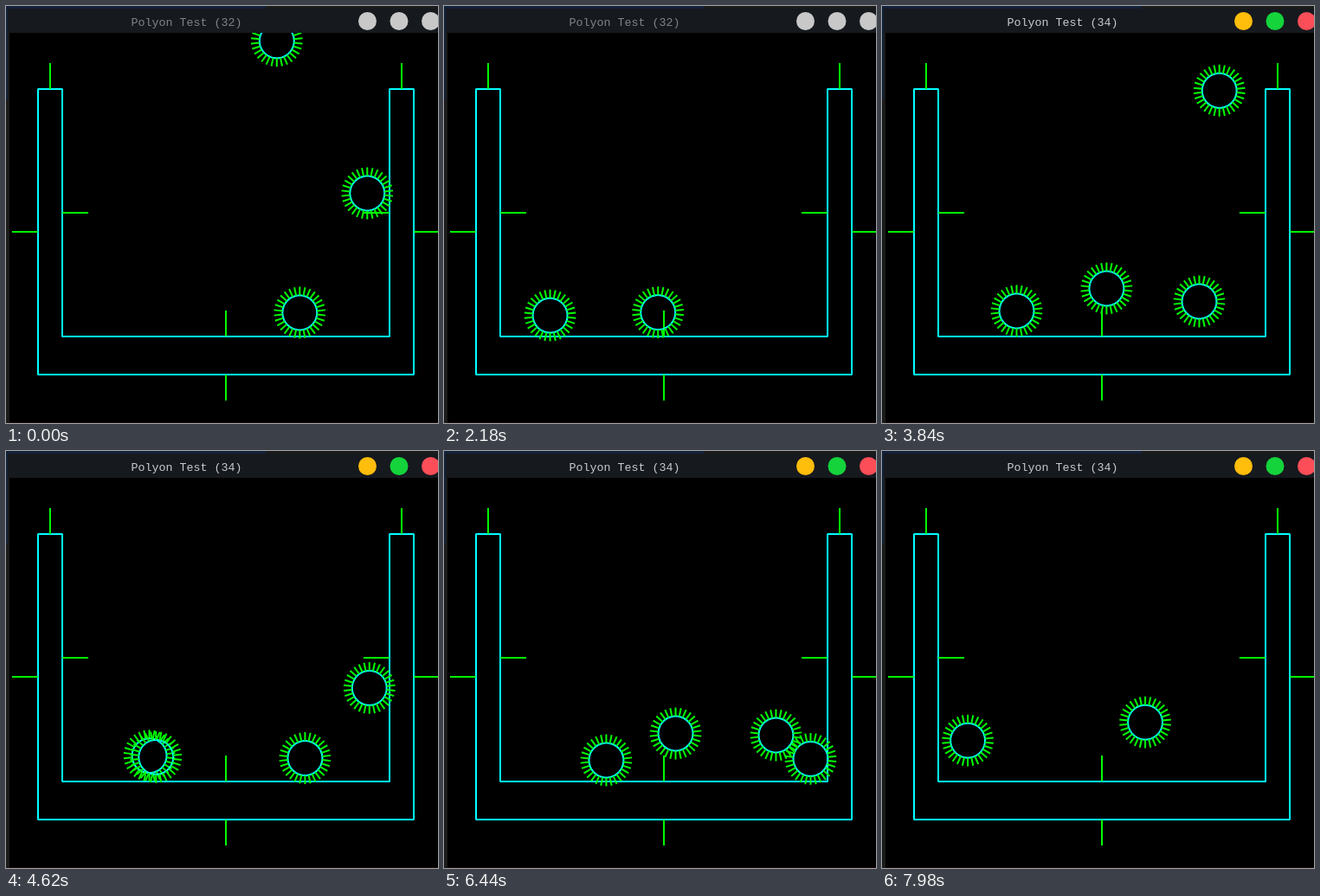
Animation, 499 px wide and 482 px high, one loop 8 s. Source, as an HTML page with a canvas:

```html
<!DOCTYPE html>
<html>
<head>
<meta charset="utf-8">
<style>
  html, body { margin: 0; width: 100%; height: 100%; overflow: hidden; background: #000; }
  canvas { display: block; }
</style>
</head>
<body>
<canvas id="stage" width="499" height="482"></canvas>
<script>
const ctx = document.getElementById('stage').getContext('2d');
const LOOP = 8, GRAVITY = 500, HOP = .4;
const LEFT = 85, RIGHT = 423, FLOOR = 362;
const RADIUS = 20, SIDES = 30, SPIKE = 10;
const CYAN = '#0ff', GREEN = '#0f0';
const SECOND_DROP = 2.19, THIRD_DROP = 3.81;

// Key poses [seconds, x, y]. An x beyond a wall is mirrored back by fold().
const escaping = [[0, 312, 40], [.8, 545, 70]];
const bouncing = [
  [[0, 417, 216], [1.36, 121, 322], [2.96, 366, 352], [3.84, 480, 341],
   [5.47, 524, 351], [6.44, 579, 326], [LOOP, 542, 313]],
  [[0, 339, 354], [1.36, 70, 350], [2.96, 27, 328], [3.84, 15, 352],
   [5.47, -6, 353], [6.44, -17, 357], [LOOP, 100, 334]],
  [[SECOND_DROP, 357, 164], [2.96, 357, 313], [3.84, 259, 326],
   [5.47, 79, 343], [6.44, -253, 356], [7.62, -290, -40]],
  [[THIRD_DROP, 388, 97], [5.47, 452, 243], [6.44, 463, 328], [7.9, 540, -40]],
];

// Mirrors x between the two walls.
function fold(x) {
  const width = RIGHT - LEFT;
  const m = (((x - LEFT) % (2 * width)) + 2 * width) % (2 * width);
  return LEFT + Math.min(m, 2 * width - m);
}

// Height over the floor: fall from h0, hop evenly, rise to h1.
// When time is too short to touch the floor, fly one arc instead.
function height(h0, h1, time, duration) {
  let fall = Math.sqrt(2 * h0 / GRAVITY), rise = Math.sqrt(2 * h1 / GRAVITY);
  const scale = Math.min(1, duration / (fall + rise));
  if (scale < .85) {
    return h0 + (h1 - h0) * time / duration + GRAVITY / 2 * time * (duration - time);
  }
  fall *= scale;
  rise *= scale;
  if (time < fall) return h0 * (1 - (time / fall) ** 2);
  if (time > duration - rise) return h1 * (1 - ((duration - time) / rise) ** 2);
  const middle = duration - fall - rise;
  const hop = middle / Math.max(1, Math.round(middle / HOP));
  const s = (time - fall) % hop;
  return GRAVITY / 2 * s * (hop - s);
}

function position(path, t) {
  const next = path.findIndex(pose => pose[0] > t);
  if (next < 1) return null;
  const [t0, x0, y0] = path[next - 1], [t1, x1, y1] = path[next];
  return [
    x0 + (x1 - x0) * (t - t0) / (t1 - t0),
    FLOOR - height(FLOOR - y0, FLOOR - y1, t - t0, t1 - t0),
  ];
}

function rect(color, x, y, w, h) {
  ctx.fillStyle = color;
  ctx.fillRect(x, y, w, h);
}

// Outline of a polygon with a normal standing on the middle of each edge.
function drawPolygon(points, normalLength) {
  ctx.lineWidth = 2;
  ctx.lineJoin = 'bevel';
  ctx.strokeStyle = CYAN;
  ctx.beginPath();
  points.forEach(([x, y]) => ctx.lineTo(x, y));
  ctx.closePath();
  ctx.stroke();

  ctx.strokeStyle = GREEN;
  ctx.beginPath();
  points.forEach(([x, y], i) => {
    const [x2, y2] = points[(i + 1) % points.length];
    const scale = normalLength / Math.hypot(x2 - x, y2 - y);
    const mx = (x + x2) / 2, my = (y + y2) / 2;
    ctx.moveTo(mx, my);
    ctx.lineTo(mx + (y2 - y) * scale, my - (x2 - x) * scale);
  });
  ctx.stroke();
}

function drawContainer() {
  drawPolygon([[37, 96], [65, 96], [65, 382], [443, 382], [443, 96], [471, 96], [471, 426], [37, 426]], 30);
}

function drawBall(x, y) {
  const points = Array.from({ length: SIDES }, (_, i) => {
    const angle = i / SIDES * 2 * Math.PI;
    return [x + .5 + RADIUS * Math.cos(angle), y + .5 + RADIUS * Math.sin(angle)];
  });
  drawPolygon(points, SPIKE);
}

function drawWindow(t) {
  const focused = t >= SECOND_DROP;
  const count = 32 + focused + (t >= THIRD_DROP);
  rect('#1b1b1b', 0, 0, 499, 482);
  rect('#12213a', 0, 0, 300, 3);
  rect('#12213a', 0, 0, 2, 108);
  rect('#16191e', 2, 3, 497, 28);
  rect('#000', 4, 31, 495, 450);
  rect('#1c0808', 4, 481, 495, 1);

  ctx.fillStyle = focused ? '#c8cbd0' : '#80848a';
  ctx.font = '13.33px "Liberation Mono", monospace';
  ctx.fillText(`Polyon Test (${count})`, 144.5, 23);

  const colors = focused ? ['#ffbd0c', '#14d33b', '#fc4e58'] : Array(3).fill('#c8c8c8');
  colors.forEach((color, i) => {
    ctx.fillStyle = color;
    ctx.beginPath();
    ctx.arc(417.5 + i * 36.5, 17.5, 10.5, 0, 2 * Math.PI);
    ctx.fill();
  });
}

function draw(t) {
  drawWindow(t);
  ctx.save();
  ctx.beginPath();
  ctx.rect(4, 31, 495, 450);
  ctx.clip();
  drawContainer();
  const escapee = position(escaping, t);
  if (escapee) drawBall(...escapee);
  for (const path of bouncing) {
    const pose = position(path, t);
    if (pose) drawBall(fold(pose[0]), pose[1]);
  }
  ctx.restore();
}

const start = performance.now();
function tick() {
  draw(((performance.now() - start) / 1000) % LOOP);
  requestAnimationFrame(tick);
}
tick();
</script>
</body>
</html>
```
